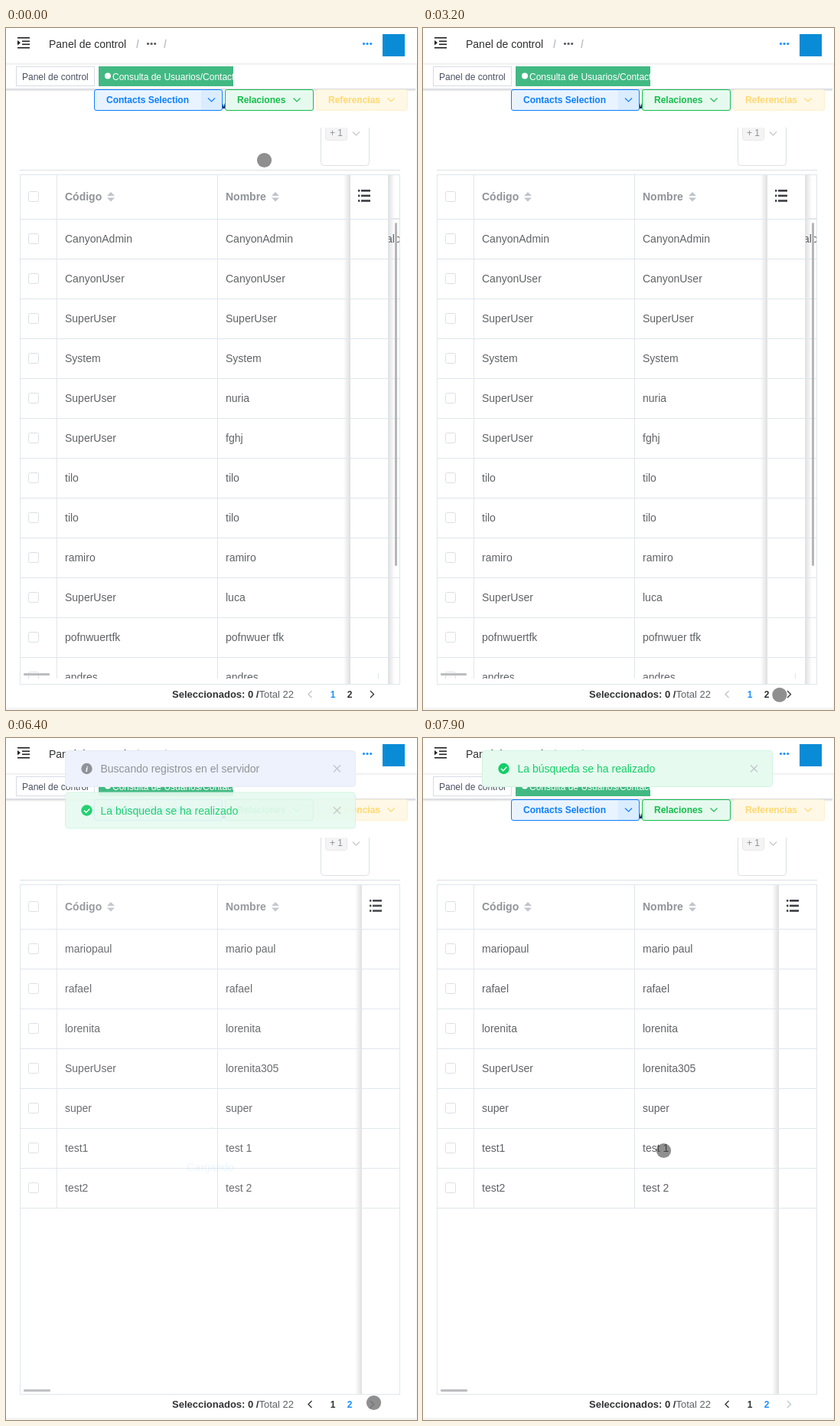
These frames come from a looping animation (537 px wide and 890 px high, 8000 ms). An HTML page:

```html
<!DOCTYPE html>
<html lang="es">
<head>
<meta charset="utf-8">
<title>Consulta</title>
<style>
html, body { margin: 0; width: 100%; height: 100%; overflow: hidden; background: #fff; }
svg { display: block; font-family: "Liberation Sans", Arial, sans-serif; }
</style>
</head>
<body>
<svg id="stage" width="537" height="890" viewBox="0 0 537 890"></svg>
<script>
const LOOP = 8000, STEP = 100;
const LOAD = 4870, DONE = 6200, LEAVE = 6670;
const LINE = '#dfe6ec', GREY = '#909399', BLUE = '#1890ff', BODY = '#606266', PALE = '#c0c4cc';

const PAGE1 = [['CanyonAdmin'], ['CanyonUser'], ['SuperUser'], ['System'], ['SuperUser', 'nuria'],
  ['SuperUser', 'fghj'], ['tilo'], ['tilo'], ['ramiro'], ['SuperUser', 'luca'],
  ['pofnwuertfk', 'pofnwuer tfk'], ['andres']];
const PAGE2 = [['mariopaul', 'mario paul'], ['rafael'], ['lorenita'], ['SuperUser', 'lorenita305'],
  ['super'], ['test1', 'test 1'], ['test2', 'test 2']];

// [time, x, y, glide]: with glide the pointer moves from the previous key, otherwise it jumps
const POINTER = [[0, 337.5, 172.5], [1900, 337.5, 172.5], [2300, 394, 695, 1], [2900, 463.5, 871],
  [3100, 463.5, 871], [3500, 473, 868, 1], [3600, 473, 868], [3900, 481.5, 867, 1], [4200, 480.5, 867.5],
  [7200, 480.5, 867.5], [7400, 160, 436, 1], [7600, 332, 513], [7800, 145, 334], [7900, 314.5, 538.5]];

const clamp = v => Math.min(1, Math.max(0, v));
const mix = (a, b, p) => a + (b - a) * p;

function bezier(x1, y1, x2, y2) {
  const at = (a, b, u) => 3 * a * u * (1 - u) ** 2 + 3 * b * u * u * (1 - u) + u ** 3;
  return x => {
    let lo = 0, hi = 1;
    for (let i = 0; i < 24; i++) {
      const mid = (lo + hi) / 2;
      if (at(x1, x2, mid) < x) lo = mid; else hi = mid;
    }
    return at(y1, y2, lo);
  };
}
const ease = bezier(.25, .1, .25, 1), easeInOut = bezier(.42, 0, .58, 1);
const since = (t, start, length) => ease(clamp((t - start) / length));

const rect = (x, y, w, h, fill, more = '') =>
  `<rect x="${x}" y="${y}" width="${w}" height="${h}" fill="${fill}" ${more}/>`;
const box = (x, y, w, h, fill, stroke, r = 0) =>
  rect(x + .5, y + .5, w - 1, h - 1, fill, `stroke="${stroke}" rx="${r}"`);
const text = (x, y, s, size, fill, more = '') =>
  `<text x="${x}" y="${y}" font-size="${size}" fill="${fill}" ${more}>${s}</text>`;
const bold = (x, y, s, size, fill, more = '') => text(x, y, s, size, fill, 'font-weight="bold" ' + more);
const stroke = (d, color, w = 1.1) => `<path d="${d}" fill="none" stroke="${color}" stroke-width="${w}"/>`;
const dot = (x, y, r, fill) => `<circle cx="${x}" cy="${y}" r="${r}" fill="${fill}"/>`;
const group = (more, ...parts) => `<g ${more}>${parts.join('')}</g>`;
const down = (x, y, color) => stroke(`M${x - 4.5} ${y - 2}l4.5 4.5l4.5 -4.5`, color);
const side = (x, y, dir, color) => stroke(`M${x - 2 * dir} ${y - 4.5}l${4.5 * dir} 4.5l${-4.5 * dir} 4.5`, color, 1.3);
const dots = (x, y, color) => [0, 4.6, 9.2].map(d => dot(x + d, y, 1.6, color)).join('');
const checkbox = y => box(29, y - 7, 14, 14, '#fff', '#dcdfe6', 2);
const list = (x, y, gap, color) => [0, 1, 2].map(i =>
  rect(x, y + i * gap, 2.4, 2.6, color) + rect(x + 4, y + i * gap, 12, 2.6, color)).join('');
const sorter = x => `<path d="M${x - 5} 219l5 -5l5 5zM${x - 5} 221.5l5 5l5 -5z" fill="${PALE}"/>`;

const DEFS = `<defs>
  <linearGradient id="left"><stop offset="0" stop-opacity="0"/><stop offset="1" stop-opacity=".13"/></linearGradient>
  <linearGradient id="right"><stop offset="0" stop-opacity=".13"/><stop offset="1" stop-opacity="0"/></linearGradient>
  <linearGradient id="drop" x2="0" y2="1"><stop offset="0" stop-opacity=".2"/><stop offset="1" stop-opacity="0"/></linearGradient>
  <clipPath id="page"><rect y="130" width="537" height="757"/></clipPath>
  <clipPath id="rows"><rect x="18" y="192" width="497" height="657"/></clipPath>
  <clipPath id="table"><rect x="18" y="191" width="497" height="666"/></clipPath>
  <clipPath id="tag"><rect x="121" y="50" width="176" height="26"/></clipPath>
  <clipPath id="chip"><rect x="417" y="95" width="13.5" height="30"/></clipPath>
</defs>`;

function button(x, w, label, chevron, ink, fill, edge) {
  return box(x, 80, w, 28, fill, edge, 2.5) + bold(x + 16, 98, label, 12, ink) + down(chevron, 93.5, ink);
}

const TOP = [
  rect(0, 46, 537, 3, 'url(#drop)', 'opacity=".4"'),
  rect(15, 12, 16, 1.6, '#222'), rect(21, 16.5, 10, 1.6, '#222'), rect(21, 20.5, 10, 1.6, '#222'),
  rect(15, 25, 16, 1.6, '#222'), '<path d="M15 16l4 3.2l-4 3.2z" fill="#222"/>',
  text(56, 26, 'Panel de control', 14, '#303133'),
  bold(170, 26, '/', 14, PALE), dots(185.5, 20.5, '#55585e'), bold(206, 26, '/', 14, PALE),
  dots(467.5, 20.5, BLUE), rect(492, 8, 29, 29, '#0a8bd6'),
  box(13, 50, 103, 26, '#fff', '#d8dce5'), text(21, 68, 'Panel de control', 12, '#495060'),
  group('clip-path="url(#tag)"', rect(121, 50, 176, 26, '#42b983'), dot(133, 62.5, 4, '#fff'),
    text(139, 68, 'Consulta de Usuarios/Contactos', 12, '#fff')),
  rect(0, 79, 535, 4, 'url(#drop)'), rect(0, 79, 535, 1, '#d8dce5'),
  bold(280, 105, 'v', 16, '#012a66'),
  button(115, 168, 'Contacts Selection', 268.5, '#0c7fff', '#e8f3ff', '#0c7fff'),
  rect(255, 81, 27, 26, '#0c7fff', 'opacity=".06"'),
  button(286, 116, 'Relaciones', 380, '#13bd4a', '#e6f9ef', '#13bd4a'),
  button(405, 120, 'Referencias', 503, '#ffd970', '#fff8e6', '#fff0cc'),
  rect(536, 46, 1, 844, '#f4f4f5'), rect(0, 887, 537, 3, '#f4f4f5')
].join('');

const CRITERIA = [
  rect(18, 92, 497, 1, '#dcdfe6'), bold(18, 115, 'Criterio de Búsqueda', 16, '#000'),
  box(411, 98, 64, 82, '#fff', '#dcdfe6', 4),
  box(417, 103, 32, 20, '#f4f4f5', '#e9e9eb', 3),
  group('clip-path="url(#chip)"', text(423, 117, 'A', 12, GREY)),
  dot(440, 113, 5.5, PALE), stroke('M438 111l4 4m0 -4l-4 4', GREY, 1),
  box(417, 127, 29, 20, '#f4f4f5', '#e9e9eb', 3), text(423, 141, '+ 1', 12, GREY),
  down(457.5, 137.5, PALE),
  list(480, 109, 5.7, '#303133').replace(/width="12"/g, 'width="10"'),
  stroke('M502 112l6.5 6.5l-6.5 6.5', '#222', 1.5),
  rect(18, 185, 497, 1, '#dcdfe6')
].join('');

function table(rows) {
  const long = rows === PAGE1, fixed = long ? 450 : 465, edge = fixed + 50;
  const lines = rows.map((_, i) => rect(18, 301 + 52 * i, 497, 1, LINE)).join('');
  const end = rows.length ? Math.min(849, 249 + 52 * rows.length) : 249;
  const cells = rows.map(([code, name = code], i) => {
    const y = 275 + 52 * i;
    return checkbox(y) + text(77, y + 5, code, 14, BODY) + text(287, y + 5, name, 14, BODY);
  });
  return group('clip-path="url(#table)"',
    checkbox(220), bold(77, 225, 'Código', 14, GREY), sorter(137),
    bold(287, 225, 'Nombre', 14, GREY), sorter(352),
    group('clip-path="url(#rows)"', lines, ...cells, long ? text(497, 280, 'alo', 14, BODY) : ''),
    rect(66, 192, 1, end - 192, LINE), rect(276, 192, 1, end - 192, LINE),
    rect(fixed - 9, 192, 9, 664, 'url(#left)'), rect(fixed, 192, 50, 664, '#fff'),
    long ? rect(edge - 1, 192, 9, 664, 'url(#right)') + rect(499, 192, 1, 657, LINE)
      + rect(500, 248, 15, 1, LINE) + rect(486, 842, 1, 7, LINE) : '',
    rect(18, 249, 497, 1, LINE), group('clip-path="url(#rows)"', lines),
    list(edge - 40, 211, 6.6, '#3a3d42'),
    rect(23, long ? 842 : 850, long ? 34 : 35, 3, '#bcbdc0', 'rx="1"'),
    long ? rect(508, 254, 3, 448, '#b5b6b9', 'rx="1.5"') : '',
    box(18, 191, 497, 666, 'none', LINE));
}

function pager(t) {
  const empty = t >= LOAD && t < DONE, last = t >= DONE;
  const page = (x, n, on) => bold(x, 874, n, 12, on ? BLUE : '#303133', 'text-anchor="middle"');
  const next = t < 4500 ? '#303133' : t < LOAD ? BLUE : PALE;
  return [
    `<text x="${empty ? 398 : 376}" y="874" font-size="13" text-anchor="end" fill="${BODY}">`
      + `<tspan font-weight="bold" fill="#303133">Seleccionados: 0 /</tspan>Total ${empty ? 0 : 22}</text>`,
    side(empty ? 419.5 : 397.5, 869.5, -1, last ? '#303133' : PALE),
    empty ? page(449, 1, true) : page(427, 1, !last) + page(449, 2, last),
    side(478, 869.5, 1, next)
  ].join('');
}

function loader(t) {
  if (t < LOAD || t > DONE + 300) return '';
  const shown = since(t, LOAD, 300) - since(t, DONE, 300);
  const age = (t - LOAD) / 1000, k = age % 1.5 / 1.5;
  const a = easeInOut(clamp(k * 2)), b = easeInOut(clamp(k * 2 - 1));
  return group(`opacity="${shown}"`,
    rect(19, 192, 496, 665, '#fff', 'opacity=".9"'),
    `<circle r="20" fill="none" stroke="${BLUE}" stroke-width="2" stroke-linecap="round"
      stroke-dasharray="${mix(1, 90, a)} ${mix(200, 150, a)}" stroke-dashoffset="${-40 * a - 80 * b}"
      transform="translate(267 525) scale(.84) rotate(${age * 180})"/>`,
    text(267, 565, 'Cargando', 14, BLUE, 'text-anchor="middle"'));
}

function message(y, opacity, label, ink, fill, edge, mark) {
  return group(`transform="translate(0 ${y})" opacity="${opacity}"`,
    box(77, 0, 380, 48, fill, edge, 4), dot(105.5, 24, 7.2, ink), mark,
    text(123.5, 29, label, 14, ink), stroke('M428 19.5l9 9m0 -9l-9 9', PALE, 1.2));
}

function messages(t) {
  const out = since(t, LEAVE, 400);
  let s = '';
  if (t >= LOAD && t < LEAVE + 400)
    s += message(mix(-32, 16, since(t, LOAD, 400) - out), since(t, LOAD, 300) - since(t, LEAVE, 300),
      'Buscando registros en el servidor', GREY, '#edf2fc', '#e6ebf5',
      bold(105.5, 28, 'i', 11, '#fff', 'font-style="italic" font-family="Liberation Serif, serif" text-anchor="middle"'));
  if (t >= DONE)
    s += message(mix(32, 80, since(t, DONE, 400)) - 64 * out, since(t, DONE, 300),
      'La búsqueda se ha realizado', '#13ce66', '#e7faf0', '#d0f5e0',
      stroke('M102 24l2.7 2.7l4.6 -4.8', '#fff', 1.5));
  return s;
}

function pointer(t) {
  const i = POINTER.findLastIndex(k => k[0] <= t);
  let [start, x, y] = POINTER[i];
  const to = POINTER[i + 1];
  if (to && to[3]) {
    const p = (t - start) / (to[0] - start);
    x = mix(x, to[1], p);
    y = mix(y, to[2], p);
  }
  return dot(x, y, 9.6, 'rgba(40,40,40,.52)');
}

// How far the page is pulled down from its scrolled-to-end position
const pull = t => t < 700 || t >= 1400 ? 0 : t < 1100 ? 45 : t < 1200 ? 44 : t < 1300 ? 43 : 20;

function scene(t) {
  const dy = pull(t);
  const bar = t < 700 ? 0 : clamp((2300 - t) / 700);
  const rows = t < LOAD ? PAGE1 : t < DONE ? [] : PAGE2;
  return DEFS + group('clip-path="url(#page)"',
      group(`transform="translate(0 ${dy})"`, CRITERIA, table(rows), pager(t), loader(t)))
    + rect(528, 176 - dy * .977, 3, 707, '#dedfe2', `rx="1.5" opacity="${bar}"`)
    + TOP + messages(t) + pointer(t);
}

const stage = document.getElementById('stage');
const begin = performance.now();
let drawn = -1;
function tick() {
  const t = Math.floor((performance.now() - begin) % LOOP / STEP) * STEP;
  if (t !== drawn) stage.innerHTML = scene(drawn = t);
  requestAnimationFrame(tick);
}
tick();
</script>
</body>
</html>
```
